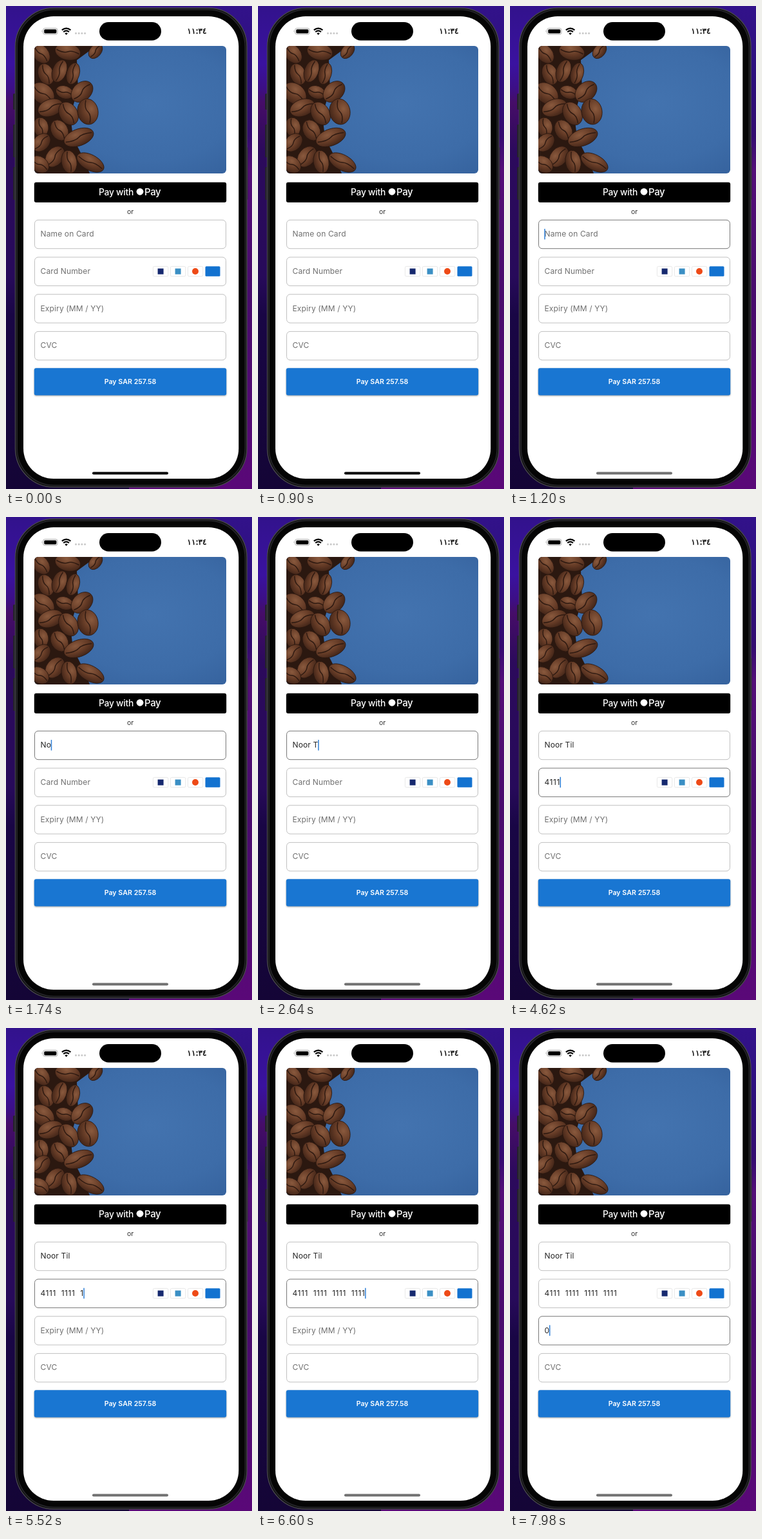
An HTML page that plays this animation: 382x750 px, repeating every 8000 ms.

```html
<!DOCTYPE html>
<html lang="en">
<head>
<meta charset="utf-8">
<title>Card payment form</title>
<style>
html, body { margin: 0; width: 100%; height: 100%; overflow: hidden; background: #1d0a52; }
svg { display: block; width: 382px; height: 750px; }
text { font-family: Inter, Roboto, "Liberation Sans", sans-serif; white-space: pre; }
.hint, .value { font-size: 12px; letter-spacing: .14px; }
.hint { fill: #6f6f6f; }
.value { fill: #252525; }
.digits { letter-spacing: .54px; }
.box { fill: #fff; }
.caret { fill: #2f7fd6; }
.chip { fill: #fff; stroke: #dedede; stroke-width: .7; }
.mid { text-anchor: middle; }
.raised { filter: drop-shadow(0 1px 1px rgba(0, 0, 0, .35)); }
</style>
</head>
<body>
<svg id="stage" viewBox="0 0 382 750">
  <defs>
    <linearGradient id="left" x2="0" y2="1">
      <stop offset="0" stop-color="#32128c"/><stop offset=".12" stop-color="#3a12a0"/>
      <stop offset=".17" stop-color="#3c0f86"/><stop offset=".2" stop-color="#460d68"/>
      <stop offset=".3" stop-color="#2c0a5c"/><stop offset=".56" stop-color="#270a5a"/>
      <stop offset=".64" stop-color="#190645"/><stop offset="1" stop-color="#140536"/>
    </linearGradient>
    <linearGradient id="right" x2="0" y2="1">
      <stop offset="0" stop-color="#32128a"/><stop offset=".15" stop-color="#2d0f7c"/>
      <stop offset=".27" stop-color="#340c70"/><stop offset=".34" stop-color="#540f78"/>
      <stop offset=".6" stop-color="#480c6c"/><stop offset="1" stop-color="#5a0878"/>
    </linearGradient>
    <radialGradient id="blue" cx=".6" cy=".45" r=".75">
      <stop offset="0" stop-color="#4373af"/><stop offset=".6" stop-color="#3d6ca8"/>
      <stop offset="1" stop-color="#34609b"/>
    </radialGradient>
    <radialGradient id="roast" cx=".42" cy=".3" r=".8">
      <stop offset="0" stop-color="#8a5a3e"/><stop offset=".5" stop-color="#653b26"/>
      <stop offset="1" stop-color="#3a2015"/>
    </radialGradient>
    <clipPath id="photo"><rect x="44" y="62" width="298" height="198" rx="6"/></clipPath>
  </defs>

  <rect width="192" height="750" fill="url(#left)"/>
  <rect x="191" width="191" height="750" fill="url(#right)"/>

  <g fill="#25222b">
    <rect x="11" y="136" width="5" height="25" rx="1.5"/>
    <rect x="11" y="184" width="5" height="51" rx="1.5"/>
    <rect x="11" y="250" width="5" height="51" rx="1.5"/>
    <rect x="371" y="219" width="4.5" height="82" rx="1.5"/>
  </g>
  <rect x="14.5" y="3" width="359.5" height="744" rx="60" fill="#050505" stroke="#47464b" stroke-width="1.5"/>
  <rect x="17" y="5.5" width="354.5" height="739" rx="58" fill="none" stroke="#242427" stroke-width="2"/>
  <rect x="27" y="16" width="334.3" height="718" rx="47" fill="#fff"/>

  <rect x="145" y="25" width="96" height="28.5" rx="14.2"/>
  <rect x="57.5" y="34.5" width="22.5" height="9.5" rx="3" fill="none" stroke="#a5a5a5" stroke-width=".9"/>
  <rect x="59.2" y="36.2" width="19.2" height="6.2" rx="1.6"/>
  <path d="M55.8 37.6q-1.6 1.6 0 3.2" fill="#a5a5a5"/>
  <path d="M86.8 37.4q6.8-5.6 13.6 0M89.2 40.2q4.4-3.6 8.8 0" fill="none" stroke="#000" stroke-width="2.1"/>
  <path d="M93.6 45l-2.3-2.5q2.3-1.8 4.6 0z"/>
  <g fill="#c6c6c6">
    <circle cx="108.5" cy="42.5" r="1.4"/><circle cx="113.2" cy="42.5" r="1.4"/>
    <circle cx="117.9" cy="42.5" r="1.4"/><circle cx="122.6" cy="42.5" r="1.4"/>
  </g>
  <text class="mid" x="296.5" y="43.3" stroke="#000" stroke-width=".35" style="font:12.2px 'DejaVu Sans',sans-serif">١١:٣٤</text>

  <g clip-path="url(#photo)">
    <rect x="44" y="62" width="298" height="198" fill="url(#blue)"/>
    <path d="M44 62H140L110 84 112 128 100 170 104 204 122 240 130 260H44z" fill="#2b1810"/>
    <g id="beans"></g>
  </g>

  <rect x="43.8" y="273.8" width="298.4" height="31.2" rx="3"/>
  <g fill="#fff">
    <text x="144" y="294" font-size="13.8" font-weight="500" letter-spacing="-.25">Pay with</text>
    <circle cx="208" cy="288.3" r="5.4"/>
    <text x="215" y="294" font-size="15" font-weight="500" letter-spacing="-.4">Pay</text>
  </g>
  <text class="mid" x="193" y="322.5" font-size="10.5" fill="#333">or</text>

  <g id="fields"></g>

  <g>
    <rect class="chip" x="228.4" y="404.4" width="23.4" height="15.4" rx="2"/>
    <rect x="235.6" y="407.6" width="9" height="9" fill="#16296f"/>
    <rect class="chip" x="255.4" y="404.4" width="23.4" height="15.4" rx="2"/>
    <rect x="262.6" y="407.6" width="9" height="9" fill="#3b8fc4"/>
    <rect class="chip" x="282.4" y="404.4" width="23.4" height="15.4" rx="2"/>
    <circle cx="294" cy="412" r="5" fill="#ee4a17"/>
    <rect x="309.5" y="404.2" width="23" height="15.6" rx="1.5" fill="#1272d0"/>
  </g>

  <rect class="raised" x="43.8" y="562.3" width="298.4" height="42.2" rx="3" fill="#1976d2"/>
  <text class="mid" x="193" y="587.3" font-size="10.6" font-weight="600" letter-spacing=".05" fill="#fff">Pay SAR 257.58</text>
  <rect id="home" x="134" y="723.6" width="118" height="3.8" rx="1.9"/>
</svg>
<script>
const LOOP = 8000, TEXT_X = 53.5;
const byId = id => document.getElementById(id);
const ramp = (t, from, length) => Math.min(1, Math.max(0, (t - from) / length));
const mix = (a, b, k) => Math.round(a + (b - a) * k);
const gray = v => `rgb(${v},${v},${v})`;

function add(parent, tag, attrs, text = '') {
  const el = document.createElementNS('http://www.w3.org/2000/svg', tag);
  for (const key in attrs) el.setAttribute(key, attrs[key]);
  el.textContent = text;
  parent.append(el);
  return el;
}

// Coffee beans: centre x, centre y, half length, half width, angle
[
  [54, 74, 17, 12, 50], [96, 71, 20, 13, 12], [139, 70, 13, 9, -50],
  [62, 106, 17, 12, 70], [83, 101, 18, 11, 110], [104, 105, 17, 10, 105],
  [57, 136, 20, 15, 40], [91, 134, 14, 10, 20], [118, 133, 19, 14, -42],
  [69, 158, 20, 13, -20], [97, 167, 19, 14, 60], [127, 164, 20, 16, 80],
  [54, 188, 15, 12, 80], [83, 193, 17, 13, 60], [55, 212, 16, 12, -45],
  [113, 204, 24, 13, -20], [76, 234, 18, 13, -50], [98, 242, 18, 12, 80],
  [131, 243, 23, 12, 28], [52, 246, 16, 12, 35]
].forEach(([x, y, a, b, turn]) => {
  const bean = add(byId('beans'), 'g', { transform: `translate(${x} ${y}) rotate(${turn})` });
  add(bean, 'ellipse', { rx: a, ry: b, fill: 'url(#roast)', stroke: '#2a170f', 'stroke-width': .8 });
  add(bean, 'path', {
    d: `M${-a * .9} 0Q${-a * .3} ${b * .3} 0 0T${a * .9} 0`,
    fill: 'none', stroke: '#2f1a11', 'stroke-width': 1.5
  });
});

// Each field: hint, typed text, focus start/end/fade, hint fade start, keystroke times
const fields = [
  { hint: 'Name on Card', text: 'Noor Til', on: 900, off: 3690, ease: 180, fade: 1530,
    keys: [1530, 1740, 1980, 2250, 2430, 2640, 3090, 3330] },
  { hint: 'Card Number', text: '4111  1111  1111  1111', style: 'digits', on: 3690, off: 7110, ease: 60, fade: 4150,
    keys: [4170, 4320, 4470, 4620, 4770, 4920, 5070, 5220,
           5520, 5670, 5850, 6000, 6150, 6330, 6480, 6600] },
  { hint: 'Expiry (MM / YY)', text: '0', on: 7110, off: LOOP + 1, ease: 90, fade: 7590, keys: [7590] },
  { hint: 'CVC', text: '', on: LOOP + 1, off: LOOP + 2, ease: 1, fade: LOOP + 1, keys: [] }
];

fields.forEach((f, i) => {
  const y = 332 + i * 57.7, parent = byId('fields'), line = { x: TEXT_X, y: y + 26.1 };
  f.box = add(parent, 'rect', { class: 'box', x: 44.5, y: y + .3, width: 297, height: 44.4, rx: 5.5 });
  f.label = add(parent, 'text', { class: 'hint', ...line }, f.hint);
  f.value = add(parent, 'text', { class: `value ${f.style || ''}`, ...line });
  f.caret = add(parent, 'rect', { class: 'caret', y: y + 14, width: 1.5, height: 16.5 });
});

// Digits are grouped in fours; the gap arrives together with the next digit
function typed(f, t) {
  const count = f.keys.filter(k => k <= t).length;
  const gaps = f.style === 'digits' && count ? Math.floor((count - 1) / 4) * 2 : 0;
  return f.text.slice(0, count + gaps);
}

function draw(now) {
  const t = now % LOOP;
  for (const f of fields) {
    const focus = ramp(t, f.on, f.ease) - ramp(t, f.off, f.ease);
    f.box.setAttribute('stroke', gray(mix(192, 120, focus)));
    f.label.setAttribute('opacity', 1 - ramp(t, f.fade, 180));
    const text = typed(f, t);
    if (f.value.textContent !== text) f.value.textContent = text;
    const width = text ? f.value.getComputedTextLength() : 0;
    f.caret.setAttribute('x', TEXT_X - .3 + width);
    f.caret.setAttribute('opacity', t >= f.on && t < f.off ? focus : 0);
  }
  byId('home').setAttribute('fill', gray(mix(0, 112, ramp(t, 900, 300))));
  requestAnimationFrame(draw);
}
requestAnimationFrame(draw);
</script>
</body>
</html>
```
